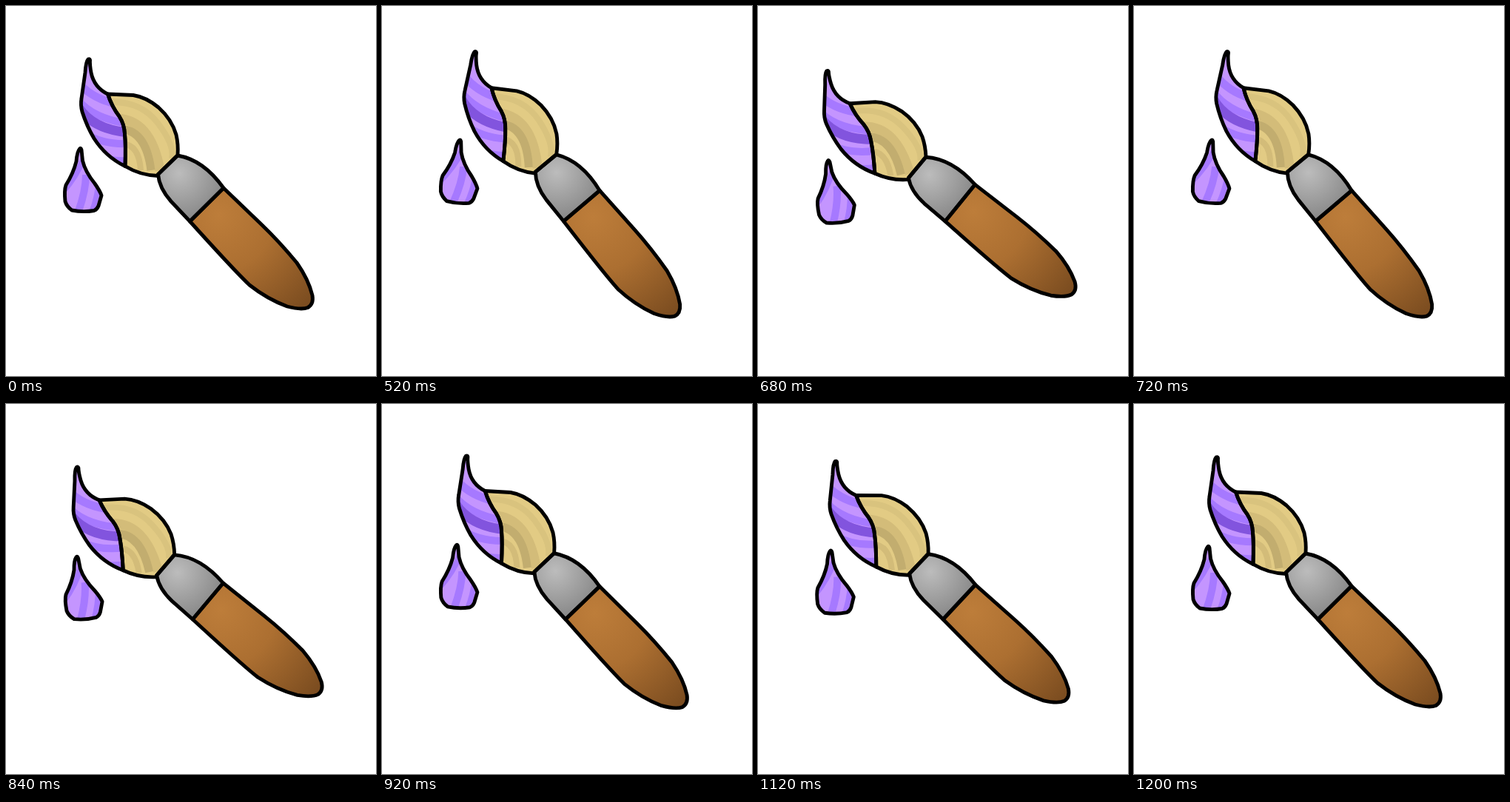
An HTML page that plays this animation: 500 px wide and 500 px high, repeating every 1.64 s.

```html
<!DOCTYPE html>
<html lang="en">
<head>
<meta charset="utf-8">
<title>Paintbrush</title>
<style>
  html, body { margin: 0; width: 100%; height: 100%; overflow: hidden; background: #fff; }
  svg { display: block; width: 100vw; height: 100vh; }
  .ink { fill: none; stroke: #000; stroke-width: 4.9; stroke-linejoin: round; stroke-linecap: round; }
  .band { fill: none; }
</style>
</head>
<body>
<svg viewBox="0 0 500 500">
  <defs>
    <path id="paint" d="M111 72Q108 75 107 90L102 125Q100.500 134 103 143Q109 162 119 179Q135 204 161 216.500Q162 188 160.500 173Q160 160 153 149Q143 136 137.500 119Q119 110 115 90Q113 79 113.500 73Q113 71 111 72Z"/>
    <path id="hair" d="M137.500 119L172 120.500Q189 123 206 137Q224 153 230 174Q233 187 232 201.500L205.500 227.500V229.500Q182 229 161 216.500Q162 188 160.500 173Q160 160 153 149Q143 136 137.500 119Z"/>
    <path id="ferrule" d="M232 202Q267 208 294 246L248.500 291L223 264Q207 246 205.500 227.500Z"/>
    <path id="handle" d="M294 246L345 295Q369 318 393 347Q409 370 414 391Q416 403 408 407.500Q399 411 380 406Q353 396 329 377Q309 358 248.500 291Z"/>
    <path id="drop" d="M99.500 193Q96 197 95 210Q91 226 81 242Q78.500 249 80 264Q82 271 89 276Q104 279 119 276.500Q123 275 125 270L129 256Q127 250 120 240Q107 224 103.500 209L102 194.500Q101 191 99.500 193Z"/>
    <clipPath id="inPaint"><use href="#paint"/></clipPath>
    <clipPath id="inHair"><use href="#hair"/></clipPath>
    <clipPath id="inDrop"><use href="#drop"/></clipPath>
    <radialGradient id="steel" gradientUnits="userSpaceOnUse" cx="234" cy="226" r="60">
      <stop offset="0" stop-color="#bcbcbc"/><stop offset="1" stop-color="#8b8b8b"/>
    </radialGradient>
    <radialGradient id="wood" gradientUnits="userSpaceOnUse" cx="288" cy="282" r="168">
      <stop offset="0" stop-color="#bd7d3a"/><stop offset=".45" stop-color="#ac6f31"/><stop offset="1" stop-color="#7c4d20"/>
    </radialGradient>
  </defs>
  <g id="brush">
    <use href="#handle" fill="url(#wood)"/>
    <use href="#ferrule" fill="url(#steel)"/>

    <g clip-path="url(#inHair)" class="band">
      <use href="#hair" fill="#e2cb84"/>
      <path d="M140 130Q182 128 205 158T224 206" stroke="#d9c37e" stroke-width="8"/>
      <path d="M150 152Q196 154 208 222" stroke="#d3bc79" stroke-width="13"/>
      <path d="M152 166Q189 166 196 222" stroke="#c2ad6f" stroke-width="11"/>
      <path d="M158 186Q180 188 182 222" stroke="#d3bc79" stroke-width="8"/>
    </g>

    <g clip-path="url(#inPaint)" class="band">
      <use href="#paint" fill="#c495ff"/>
      <path d="M98 104Q119 128 158 134" stroke="#a679ff" stroke-width="11"/>
      <path d="M97 127Q118 152 165 159" stroke="#a679ff" stroke-width="10"/>
      <path d="M98 137Q118 167 166 171" stroke="#8254de" stroke-width="13"/>
      <path d="M104 171Q131 188 167 186" stroke="#a679ff" stroke-width="10"/>
      <path d="M120 201Q144 211 168 208" stroke="#a679ff" stroke-width="9"/>
    </g>

    <g clip-path="url(#inDrop)" class="band">
      <use href="#drop" fill="#c495ff"/>
      <path d="M105 205Q96 230 76 252" stroke="#a679ff" stroke-width="8"/>
      <path d="M108 228Q108 250 97 280" stroke="#a679ff" stroke-width="10"/>
      <path d="M125 238Q123 260 115 280" stroke="#a679ff" stroke-width="7"/>
    </g>

    <g class="ink">
      <use href="#handle"/>
      <use href="#ferrule"/>
      <use href="#hair"/>
      <use href="#paint"/>
      <use href="#drop"/>
    </g>
  </g>
</svg>
<script>
  const LOOP = 1640, STEP = 40;
  // Turning points of the shake: [ms, degrees]
  const swings = [[480, 0], [555, 8], [641, -12], [745, 7], [805, -6], [1040, 8], [1140, -3.3], [1200, 0]];
  const brush = document.getElementById("brush");
  const ease = p => (1 - Math.cos(Math.PI * p)) / 2;

  function angleAt(t) {
    const i = swings.findIndex(([end]) => t < end);
    if (i < 1) return 0;
    const [t0, a0] = swings[i - 1], [t1, a1] = swings[i];
    return a0 + (a1 - a0) * ease((t - t0) / (t1 - t0));
  }

  function draw(ms) {
    const t = Math.floor((ms % LOOP) / STEP) * STEP;
    brush.setAttribute("transform", `rotate(${angleAt(t).toFixed(3)} 250 250)`);
  }

  let start;
  function tick(now) {
    start ??= now;
    draw(now - start);
    requestAnimationFrame(tick);
  }
  draw(0);
  requestAnimationFrame(tick);
</script>
</body>
</html>
```
